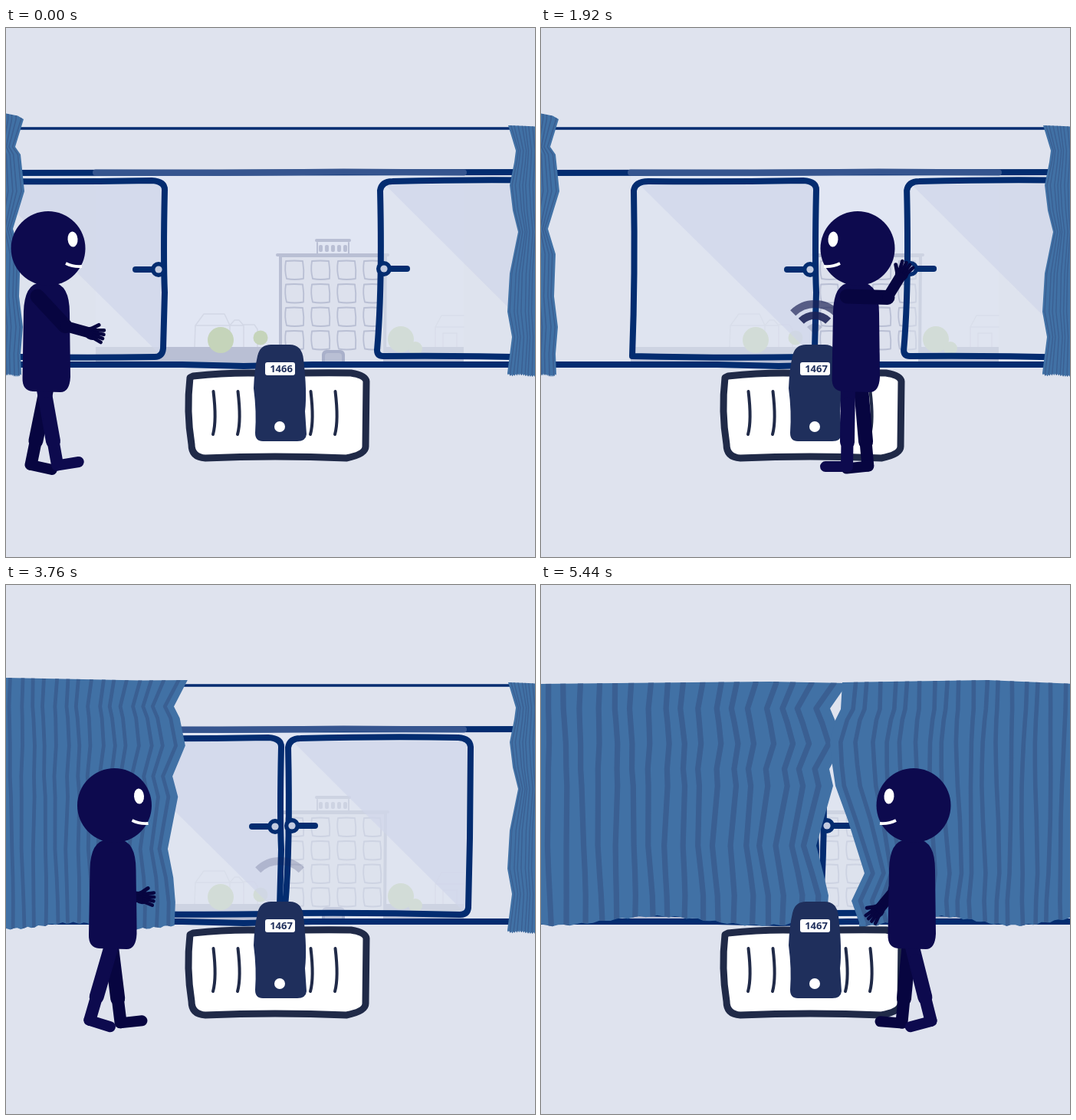
Write an HTML page with a canvas that moves like this. It is 690 px wide and 690 px high and loops after 5520 ms.

```html
<!DOCTYPE html>
<html lang="en">
<head>
<meta charset="utf-8">
<title>Closing windows and curtains</title>
<style>
html, body { margin: 0; width: 100%; height: 100%; overflow: hidden; background: #dfe3ee; }
canvas { display: block; width: 100%; height: 100%; }
</style>
</head>
<body>
<canvas id="stage" width="690" height="690"></canvas>
<script>
const g = document.getElementById('stage').getContext('2d');
const LOOP = 5520, STEP = 80;
const WALL = '#dfe3ee', NAVY = '#032c70', SKIN = '#0d0a4e', SHADE = '#070540', FAINT = '#b9bfd4';

const lerp = (a, b, p) => a + (b - a) * p;
const clamp = (v, a = 0, b = 1) => Math.max(a, Math.min(b, v));
const ease = (t, a, b) => (1 - Math.cos(Math.PI * clamp((t - a) / (b - a)))) / 2;

// Linear interpolation through [time, value] pairs.
function key(t, pairs) {
  let i = 1;
  while (i < pairs.length - 1 && pairs[i][0] < t) i++;
  const [a, u] = pairs[i - 1], [b, v] = pairs[i];
  return lerp(u, v, clamp((t - a) / (b - a)));
}

function line(points, color, width, close) {
  g.beginPath();
  points.forEach(([x, y]) => g.lineTo(x, y));
  if (close) g.closePath();
  g.strokeStyle = color;
  g.lineWidth = width;
  g.stroke();
}

function shape(d, fill, stroke, width) {
  const p = new Path2D(d);
  if (fill) { g.fillStyle = fill; g.fill(p); }
  if (stroke) { g.strokeStyle = stroke; g.lineWidth = width; g.stroke(p); }
}

function box(x, y, w, h, r, fill) {
  g.beginPath();
  g.roundRect(x, y, w, h, r);
  g.fillStyle = fill;
  g.fill();
}

function oval(x, y, rx, ry, fill, turn = 0) {
  g.beginPath();
  g.ellipse(x, y, rx, ry, turn, 0, 7);
  g.fillStyle = fill;
  g.fill();
}

function at(x, y, draw) {
  g.save();
  g.translate(x, y);
  draw();
  g.restore();
}

function view() {
  box(0, 0, 690, 690, 0, WALL);
  line([[0, 131], [690, 131]], NAVY, 3.5);
  box(117, 185, 480, 252, 0, '#e1e6f3');
  shape('M246 416L247 388L258 373H285L292 388V416M247 388H310V416M292 388L298 381H304L310 388M310 387H324L328 393V416M560 416V390L568 375H597M560 390H597M570 416V398H588V416', null, '#d3d8e6', 1.5);
  box(117, 416, 480, 21, 0, FAINT);

  box(357, 296, 139, 140, 0, '#dde1ed');
  line([[358, 436], [358, 297], [495, 297], [494, 436]], FAINT, 4);
  line([[354, 296], [498, 296]], FAINT, 4);
  line([[405, 277], [448, 277]], FAINT, 4);
  line([[406, 280], [406, 294]], FAINT, 2);
  line([[447, 280], [447, 294]], FAINT, 2);
  for (let i = 0; i < 5; i++) box(408 + i * 8, 283, 5, 9, 2, FAINT);
  for (let r = 0; r < 4; r++) for (let c = 0; c < 4; c++) {
    const x = 364 + c * 34, y = 304 + r * 30.5, w = c === 3 ? 23 : 24;
    shape(`M${x + 1} ${y}Q${x + 12} ${y - 1} ${x + w - 1} ${y}Q${x + w + 1} ${y + 12} ${x + w} ${y + 23}Q${x + 12} ${y + 25} ${x + 2} ${y + 23}Q${x - 1} ${y + 12} ${x + 1} ${y}Z`, null, FAINT, 1.8);
  }
  box(412, 420, 30, 18, [6, 6, 0, 0], '#a9b0ca');
  box(416, 424, 22, 14, [4, 4, 0, 0], FAINT);

  for (const [x, y, r] of [[280, 407, 17], [332, 404, 9.5], [515, 406, 17], [534, 418, 9]])
    oval(x, y, r, r, '#c5d4ba');

  line([[0, 189], [690, 188]], NAVY, 8);
  line([[117, 188.5], [280, 189], [440, 187.5], [597, 188.5]], '#36558f', 8);
  line([[0, 439], [230, 439], [310, 441], [400, 439], [690, 439]], NAVY, 8);
}

function pane(d, shine, shift, knobX, knobY, dir) {
  at(shift, 0, () => {
    shape(d, 'rgba(222,227,238,.55)');
    shape(shine, 'rgba(208,214,234,.68)');
    shape(d, null, NAVY, 8);
    line([[knobX + dir * 10, knobY], [knobX + dir * 30, knobY]], NAVY, 8);
    oval(knobX, knobY, 10, 10, NAVY);
    oval(knobX, knobY, 4.6, 4.6, '#c3cbe0');
  });
}

function signal(t) {
  const start = t < 1560 ? 300 : t < 2880 ? 1560 : 2880;
  const p = t - start;
  if (p < 0) return;
  const arc = (r, alpha) => {
    if (alpha <= 0) return;
    g.beginPath();
    g.arc(357, 400, r, -Math.PI * .75, -Math.PI * .25);
    g.strokeStyle = `rgba(28,34,86,${alpha})`;
    g.lineWidth = 10;
    g.stroke();
  };
  g.lineCap = 'butt';
  const dot = clamp(1 - Math.abs(p - 150) / 260);
  if (dot > 0) shape('M357 400L347 390Q357 381 367 390Z', `rgba(28,34,86,${dot})`);
  arc(25, clamp(1 - Math.abs(p - 400) / 350));
  arc(40, Math.min(clamp((p - 190) / 250, 0, .75), clamp((960 - p) / 400)));
  g.lineCap = 'round';
}

const LEFT = {
  dir: -1, end: -8, gap: [5, 22], top: [110, 129], bump: 126, peak: .22,
  open: [[23, 119], [12, 155], [19, 165], [24, 213], [9, 262], [19, 295], [17, 350], [22, 390], [19, 425], [20, 452]],
  shut: [[400, 128], [377, 161], [385, 180], [394, 207], [376, 240], [381, 262], [359, 340], [368, 375], [375, 405], [372, 440]]
};
const RIGHT = {
  dir: 1, end: 698, gap: [4.2, 17], top: [129, 129], bump: 124, peak: .72,
  open: [[655, 127], [665, 160], [663, 175], [657, 205], [661, 238], [668, 266], [657, 320], [654, 370], [660, 403], [654, 450]],
  shut: [[393, 127], [391, 162], [384, 176], [377, 205], [380, 235], [384, 262], [400, 306], [422, 376], [405, 412], [415, 440]]
};

function curtain(c, p) {
  const edge = c.open.map(([x, y], i) => [lerp(x, c.shut[i][0], p), lerp(y, c.shut[i][1], p)]);
  const mean = edge.reduce((s, [x]) => s + x, 0) / edge.length;
  const [footX, footY] = edge[9];
  const mid = lerp(edge[0][0], c.end, c.dir > 0 ? .62 : .25);
  const topY = lerp(c.top[0], c.top[1], p);
  g.save();
  g.beginPath();
  g.moveTo(c.end, topY);
  g.lineTo(mid, lerp((topY + edge[0][1]) / 2, c.bump, p));
  edge.forEach(([x, y]) => g.lineTo(x, y));
  for (let u = 0; u <= 1.001; u += .02) {
    const sag = lerp(1, 6, p) * Math.cos((u - c.peak) / .72 * 2 * Math.PI);
    g.lineTo(lerp(footX, c.end, u), lerp(footY, lerp(453, 438, p), clamp(u * 8)) + sag + 1.2 * Math.sin(u * 95));
  }
  g.closePath();
  g.fillStyle = '#4171a5';
  g.fill();
  g.clip();
  const gap = lerp(c.gap[0], c.gap[1], p);
  for (let k = 0; k < 20; k++) {
    const pull = Math.exp(-k * .2);
    const fold = edge.map(([x, y]) => [
      mean + c.dir * (k + .75) * gap + (x - mean) * pull + lerp(.5, 2, p) * Math.sin(k * 1.9 + y / 60) - c.dir * p * (y - 285) * .02,
      y]);
    const [a, b] = [fold[0], fold[9]];
    line([[a[0], a[1] - 20], ...fold, [b[0], b[1] + 20]], '#3a5f92', gap * .33);
  }
  g.restore();
}

function radiator(count) {
  shape('M244 454Q300 448 350 451Q410 449 450 450Q469 453 470 461L469 546Q469 556 444 561Q350 557 260 561Q242 560 242 543Q235 500 240 456Z', '#fff', '#202a48', 9);
  for (const x of [271, 303, 398, 430])
    shape(`M${x - .5} 474Q${x + 4} 512 ${x - 1} 530`, null, '#202a48', 4);
  shape('M346 413H370Q386 413 388 432Q393 475 390 500L392 530Q391 539 380 539H335Q325 539 325 528Q327 500 323 470Q324 445 328 428Q331 413 346 413Z', '#1f2f5c');
  box(338, 436, 39, 17, 3, '#fff');
  g.fillStyle = '#1f2f5c';
  g.font = 'bold 13px "Open Sans", sans-serif';
  g.textAlign = 'center';
  g.fillText(count, 359, 449);
  oval(357, 520, 7, 7, '#fff');
}

const WALK = [[0, 55], [400, 163], [640, 222], [800, 250], [1120, 332], [1200, 362], [1400, 415], [1760, 423],
  [1920, 413], [2240, 396], [2480, 388], [2660, 388], [2800, 368], [3120, 220.5], [3200, 183], [3360, 112],
  [3480, 80], [3600, 92], [3760, 141.5], [4320, 348], [4640, 494.5], [4880, 608], [5000, 625], [5120, 610],
  [5440, 486], [5520, 455]];
const STRIDE = [[0, .15], [640, 1], [800, 1], [1400, 2], [1920, 2.03], [2660, 2.03], [3120, 3.06], [3760, 4.7],
  [4640, 6.41], [4960, 7], [5440, 7.65], [5520, 7.8]];
const HAND_X = [[0, 52], [200, 62], [900, 60], [1100, 38], [1400, 60], [2560, -10], [2800, -26], [3120, -22],
  [3400, -50], [3480, 45], [3760, 31], [4320, 45], [4640, 36], [4880, 52], [4960, -45], [5440, -46]];
const HAND_Y = [[0, 397], [200, 360], [900, 340], [1100, 420], [1400, 360], [2560, 350], [2800, 420], [3120, 425],
  [3400, 400], [3760, 407], [4320, 425], [4640, 430], [4880, 410], [4960, 400], [5440, 425]];

function leg(x, dir, angle, color) {
  at(x, 470, () => {
    g.scale(dir, 1);
    g.rotate(-angle * Math.PI / 180);
    line([[0, 0], [0, 70]], color, 19);
    line([[0, 20], [0, 101]], color, 16);
    line([[-1, 102], [28, 102.5]], color, 14);
  });
}

// Two-bone arm; the elbow hangs below the line from shoulder to wrist.
function arm(sx, sy, tx, ty) {
  const upper = 53, fore = 31;
  const d = clamp(Math.hypot(tx - sx, ty - sy), 23, 83.5);
  const aim = Math.atan2(ty - sy, tx - sx);
  const bend = Math.acos(clamp((upper * upper + d * d - fore * fore) / (2 * upper * d), -1, 1));
  const a = aim + (tx >= sx ? bend : -bend);
  const ex = sx + upper * Math.cos(a), ey = sy + upper * Math.sin(a);
  const wx = sx + d * Math.cos(aim), wy = sy + d * Math.sin(aim);
  line([[sx, sy], [ex, ey]], SHADE, 19);
  line([[ex, ey], [wx, wy]], SHADE, 14);
  at(wx, wy, () => {
    g.rotate(Math.atan2(wy - ey, wx - ex));
    if (tx < sx) g.scale(1, -1);
    oval(5, 0, 10, 8.5, SHADE);
    for (let i = -1.5; i < 2; i++) line([[8, i * 3.4], [21 - Math.abs(i), i * 5.4]], SHADE, 4.6);
    line([[2, -5], [11, -13]], SHADE, 5);
  });
}

function person(t, leftKnob, rightKnob) {
  const x = key(t, WALK);
  const dir = t < 1700 || (t >= 3480 && t < 4960) ? 1 : -1;
  const turn = key(t, STRIDE) * 2 * Math.PI;
  const swing = Math.sin(turn), spread = 9 * Math.cos(turn) ** 3;

  const holdLeft = key(t, [[0, 0], [240, 1], [840, 1], [960, 0]]);
  const holdRight = key(t, [[1360, 0], [1520, 1], [2520, 1], [2680, 0]]);
  let hx = x + key(t, HAND_X), hy = key(t, HAND_Y);
  hx = lerp(lerp(hx, leftKnob - 31, holdLeft), rightKnob - 14, holdRight);
  hy = lerp(hy, 325, Math.max(holdLeft, holdRight));
  const behind = t >= 3480;
  const shoulder = x + (behind ? 0 : key(t, [[2560, -14], [2800, 8]]));
  const drawArm = () => arm(shoulder, 350, hx, hy);

  if (behind) drawArm();
  leg(x - 4 + spread, dir, -10.5 * swing - 3, SHADE);
  leg(x - 4 - spread, dir, 15 * swing - 2, SKIN);
  shape(`M${x - 10} 332H${x + 6}Q${x + 28} 334 ${x + 28} 372L${x + 29} 455Q${x + 28} 475 ${x + 16} 475L${x - 20} 474Q${x - 34} 473 ${x - 33.5} 456L${x - 32} 370Q${x - 31} 334 ${x - 10} 332Z`, SKIN);
  oval(x, 287.5, 48.5, 48.5, SKIN);
  at(x, 0, () => {
    g.scale(dir, 1);
    oval(32, 275.5, 6.5, 10, '#fff', -.08);
    g.lineCap = 'butt';
    shape('M23 307Q33 312 44 311', null, '#fff', 3.8);
    g.lineCap = 'round';
  });
  if (!behind) drawArm();
}

const LEFT_PANE = 'M121 212Q123 200 140 200Q240 201 342 199Q359 200 359 211Q357 300 359 345L357 418Q356 429 346 429Q240 431 119 428Q123 320 121 212Z';
const LEFT_SHINE = 'M128 204H355V428Z';
const RIGHT_PANE = 'M368 212Q370 200 384 200Q500 197 590 199Q605 200 606 211L605 330L603 421Q602 430 592 430Q480 427 372 428Q364 428 364 420Q371 340 368 212Z';
const RIGHT_SHINE = 'M374 204H601L599 428Z';

function draw(t) {
  g.lineCap = g.lineJoin = 'round';
  const leftShift = -152 * (1 - ease(t, 160, 880));
  const rightShift = 120 * (1 - ease(t, 1780, 2500));
  view();
  pane(LEFT_PANE, LEFT_SHINE, leftShift, 351, 315, -1);
  pane(RIGHT_PANE, RIGHT_SHINE, rightShift, 373, 314, 1);
  signal(t);
  curtain(LEFT, ease(t, 3380, 4080));
  curtain(RIGHT, ease(t, 4980, 5440));
  radiator(t < 1560 ? '1466' : '1467');
  person(t, 351 + leftShift, 373 + rightShift);
}

const begin = performance.now();
function tick() {
  const t = (performance.now() - begin + 8) % LOOP;
  draw(Math.floor(t / STEP) * STEP);
  requestAnimationFrame(tick);
}
tick();
</script>
</body>
</html>
```
